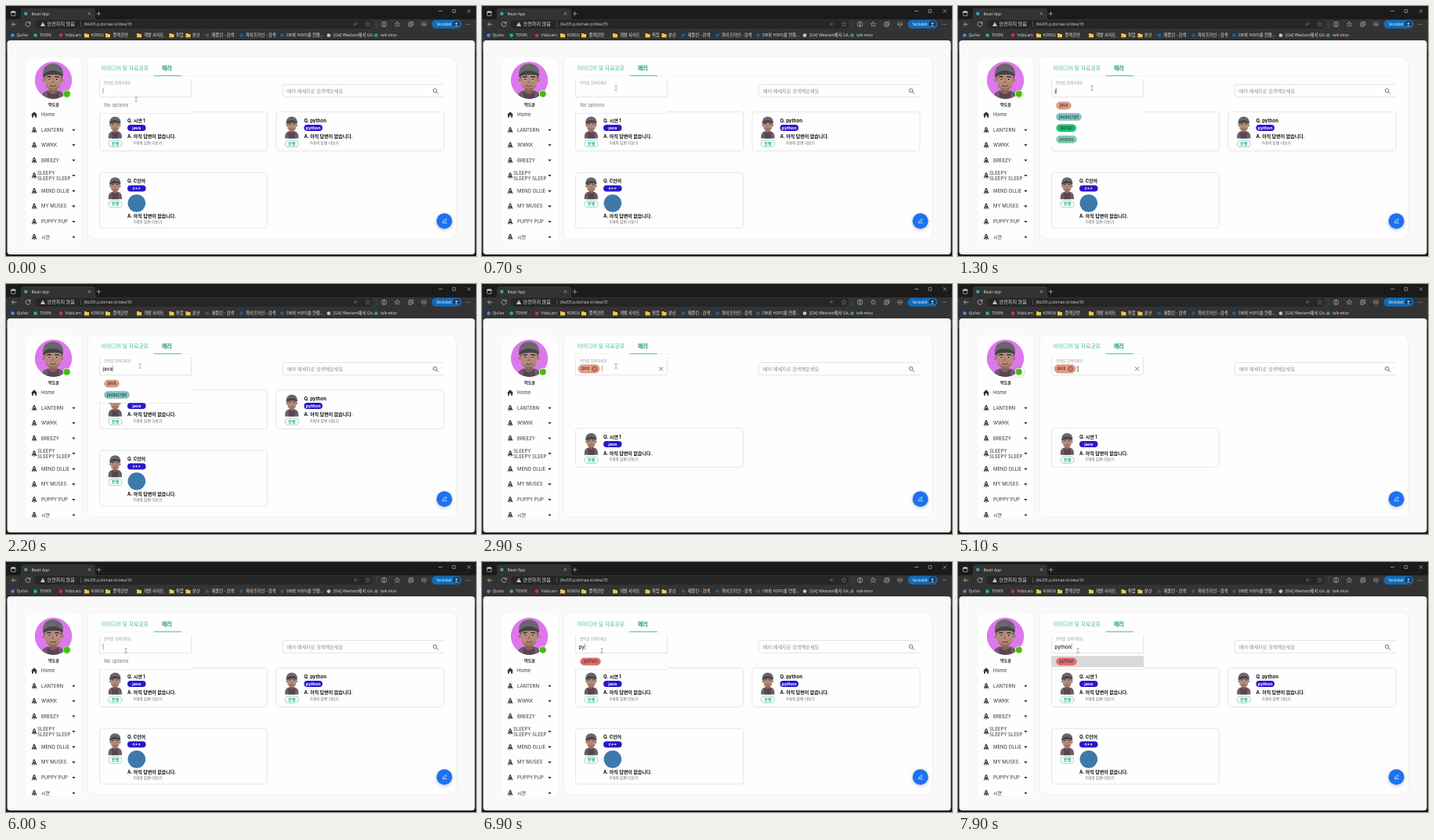
Recreate the animation shown at these times as an HTML page. Size 600 by 320 pixels, loop 8000 ms.

```html
<!DOCTYPE html>
<html lang="ko">
<head>
<meta charset="utf-8">
<title>Language search</title>
<style>
  html, body { margin: 0; width: 100%; height: 100%; overflow: hidden; background: #1b1b1b; }
  svg { display: block; width: 600px; height: 320px; }
  text { font-family: Inter, "Noto Sans CJK KR", "Noto Sans CJK", sans-serif; white-space: pre; }
  .ui { font-family: "Open Sans", "Noto Sans CJK KR", "Noto Sans CJK", sans-serif; }
  .line { fill: none; stroke-linecap: round; stroke-linejoin: round; }
  .paper { filter: drop-shadow(0 .8px .6px rgba(0,0,0,.4)); }
  .float { filter: drop-shadow(0 1.6px 2px rgba(0,0,0,.28)); }
</style>
</head>
<body>
<svg id="stage" viewBox="0 0 600 320" xmlns="http://www.w3.org/2000/svg"></svg>
<script>
const LOOP = 8000;
const stage = document.getElementById('stage');

// Markup helpers; text is placed by its vertical middle.
const text = (x, y, s, size, fill = '#333', extra = '') =>
  `<text x="${x}" y="${y + size * 0.36}" font-size="${size}" fill="${fill}" ${extra}>${s}</text>`;
const rect = (x, y, w, h, fill, r = 0, extra = '') =>
  `<rect x="${x}" y="${y}" width="${w}" height="${h}" rx="${r}" fill="${fill}" ${extra}/>`;
const circle = (x, y, r, fill, extra = '') =>
  `<circle cx="${x}" cy="${y}" r="${r}" fill="${fill}" ${extra}/>`;
const line = (d, stroke, w = 0.8, extra = '') =>
  `<path class="line" d="${d}" stroke="${stroke}" stroke-width="${w}" ${extra}/>`;
const shape = (d, fill) => `<path d="${d}" fill="${fill}"/>`;
const at = (x, y, s, body) => `<g transform="translate(${x} ${y}) scale(${s})">${body}</g>`;
const BOLD = 'font-weight="700"';
const MID = 'text-anchor="middle"';

const defs = `<defs>
  <clipPath id="face"><circle cx="60.5" cy="95" r="23.7"/></clipPath>
  <clipPath id="side"><rect x="25" y="65" width="73" height="235"/></clipPath>
  <g id="man">
    ${shape('M-16 32Q-17 18 -8 15L8 15Q17 18 16 32Z', '#6d5c69')}
    ${shape('M-5 10H5V17Q0 22 -5 17Z', '#84604f')}
    ${shape('M-7 15Q0 24 7 15L8 32H-8Z', '#57454f')}
    ${shape('M-12 -6H12L11 3H-11Z', '#3b3233')}
    ${circle(-11.3, 1.5, 2.3, '#a0786a')}${circle(11.3, 1.5, 2.3, '#a0786a')}
    ${shape('M-10.5 -6H10.5V3Q9.5 14 0 15Q-9.5 14 -10.5 3Z', '#b58a78')}
    ${shape('M-9.6 7Q-7 14 0 15Q7 14 9.6 7Q6 11.5 0 12Q-6 11.5 -9.6 7Z', '#94705f')}
    ${line('M-3.6 8.6Q0 10.6 3.8 8.2', '#65413a', 1.1)}
    ${shape('M-2 5Q0 -1 2 5Z', '#a0735f')}
    ${circle(-4.6, 0.4, 1.6, '#e6dedb')}${circle(4.6, 0.4, 1.6, '#e6dedb')}
    ${circle(-4.6, 0.4, 1.1, '#2b2020')}${circle(4.6, 0.4, 1.1, '#2b2020')}
    ${line('M-7.4 -2.6L-3 -3M3 -3L7.4 -2.6', '#33241f', 1.4)}
    ${shape('M-13 -4Q-14 -19 0 -20Q14 -19 13 -4Q0 -9 -13 -4Z', '#69666c')}
    ${shape('M-14 -3Q-9 -12 1 -11Q11 -10 13 -4Q0 -8 -14 -3Z', '#454248')}
  </g>
  <g id="rocket">
    ${shape('M0 -4.2Q2.4 -2.2 2 2.2H-2Q-2.4 -2.2 0 -4.2ZM-1.9 0L-3 1.8V3.6L-1.6 2.6ZM1.9 0L3 1.8V3.6L1.6 2.6ZM-1 2.7H1L0 4.3Z', '#3a3a3a')}
    ${circle(0, -0.9, 0.8, '#fff')}
  </g>
</defs>`;

function browser() {
  const ink = '#cfcfcf', dim = '#8d8d8d';
  const ui = (x, y, s, size = 5, fill = '#e6e6e6', extra = '') => text(x, y, s, size, fill, `class="ui" ${extra}`);
  const folder = x => shape(`M${x - 3} 35H${x - 0.6}L${x + 0.3} 36H${x + 3}V40.2H${x - 3}Z`, '#f3c64c');
  const marks = [
    [8.5, 13.5, 'Quilvo', '#4a86e8'], [37.5, 43, 'TOVEK', '#1ec35a'], [70, 75.5, 'VidoLarn', '#e0302c'],
    [103, 108.5, 'KORDU'], [130, 136.5, '플젝관련'], [170, 176, '개발 사이트'], [211.5, 217, '취업'], [232.5, 238, '분산'],
    [257, 262.5, '재플린 - 검색', '#1d5f96'], [300.5, 306, '파이프라인 - 검색', '#1d5f96'],
    [352.5, 358, 'DB와 HDFS를 연결...', '#1d5f96'], [412, 418, '[Git] Wexlam에서 Git...', '#c9c9c9'],
    [472.5, 478, 'talk-mivo', '#3d8f86']
  ];
  const size = s => /[가-힣]/.test(s) ? 5.3 : 4.9;
  return rect(0, 0, 600, 320, '#1b1b1b')
    + rect(0, 17, 600, 40, '#333333')
    + `<path d="M17 17.5Q19 17 19 14V6Q19 3 22 3H111Q114 3 114 6V14Q114 17 116 17.5Z" fill="#333333"/>`
    + rect(6.5, 7, 5.5, 5.5, 'none', 1, `stroke="${ink}" stroke-width=".7"`) + rect(6.5, 6.7, 5.5, 2, ink, 0.6)
    + circle(25.3, 9.8, 2.2, '#459db5') + ui(32.5, 9.8, 'React App', 4.8)
    + line('M105 8.4L107.8 11.2M107.8 8.4L105 11.2M116 9.8H121M118.5 7.3V12.3', ink, 0.6)
    + line('M552.5 6.5H556.7M589 4.6L592.8 8.4M592.8 4.6L589 8.4', ink, 0.6)
    + rect(570, 4.6, 3.8, 3.8, 'none', 0.5, `stroke="${ink}" stroke-width=".6"`)
    + line('M13 23.3H7.5M9.8 20.9L7.4 23.3L9.8 25.7', ink, 0.7)
    + line('M30.6 21.6A3 3 0 1 0 31 24M31 20.2V22.2H29', ink, 0.7)
    + rect(37, 18, 431, 11, '#262626', 5)
    + shape('M47 20.4L50 25.8H44Z', '#e2e2e2') + line('M47 22.4V24', '#262626', 0.6)
    + ui(52.6, 23.2, '안전하지 않음', 6.1)
    + line('M95.5 20V26.5', '#777', 0.5)
    + ui(99.5, 23.2, 'j9e205.p.domae.io/idea/35', 4.9, '#d6d6d6')
    + ui(444, 23.3, 'A', 5.4, dim) + line('M448.4 20.8Q449.6 22 448.7 23.2', dim, 0.5)
    + [[462, dim], [499.5, ink]].map(([x, c]) => line(`M${x} 20.2L${x + 1} 22.2L${x + 3.1} 22.4L${x + 1.6} 24L${x + 2} 26.1L${x} 25.1L${x - 2} 26.1L${x - 1.6} 24L${x - 3.1} 22.4L${x - 1} 22.2Z`, c, 0.5)).join('')
    + line('M473 19.5V27', '#555', 0.5)
    + rect(479.8, 20.7, 5.6, 5.2, 'none', 1, `stroke="${ink}" stroke-width=".6"`) + line('M482.6 20V26.6', ink, 0.6)
    + rect(513.7, 21.5, 4.8, 4.8, 'none', 1, `stroke="${ink}" stroke-width=".6"`) + line('M515 20.2H519.8V25M516.1 22.8V25M515 23.9H517.2', ink, 0.5)
    + line('M533.5 26.4L530.7 23.6Q530 21 532 20.7Q533 20.7 533.5 21.6Q534 20.7 535 20.7Q537 21 536.3 23.6ZM531 23.6H532.7L533.5 22.5L534.2 24.4L534.7 23.6H536', ink, 0.5)
    + rect(543.5, 17.8, 38, 11, '#116cba', 5.5) + ui(549.5, 23.2, 'Secluded', 4.5, '#fff')
    + circle(575, 23.3, 4.3, '#1a3450') + circle(575, 22.2, 1.5, '#86b6e0') + shape('M572.3 26.2Q575 22.6 577.7 26.2Z', '#86b6e0')
    + [588.2, 590.3, 592.4].map(x => circle(x, 23.3, 0.5, ink)).join('')
    + marks.map(([ix, tx, s, c]) => (c ? circle(ix, 37.5, 2.3, c) : folder(ix)) + ui(tx, 37.3, s, size(s))).join('');
}

function sidebar() {
  const items = [
    [158.7, 'LANTERN'], [178, 'WWKK'], [197.5, 'BREEZY'], [217, ''], [236.8, 'MEND OLLIE'],
    [256.3, 'MY MUSES'], [275.9, 'PUPPY PUP'], [295.4, '시연']
  ];
  const rows = items.map(([y, s], i) => {
    const up = i === items.length - 1;
    const label = s ? text(45, y, s, 6) : text(40, 213.4, 'SLEEPY', 6) + text(40, 221, 'SLEEPY SLEEP', 6);
    const arrow = up ? `M84.2 ${y + 1.2}H88.6L86.4 ${y - 1.4}Z` : `M84.2 ${y - 1}H88.6L86.4 ${y + 1.6}Z`;
    return at(36, y, 1, '<use href="#rocket"/>') + label + shape(arrow, '#333');
  }).join('');
  return `<g clip-path="url(#side)">${rect(25, 65, 72, 250, '#fefefe', 8, 'stroke="#efefef" stroke-width=".6"')}
    ${circle(60.5, 95, 23.7, '#dc78ec')}
    <g clip-path="url(#face)">${at(60, 93.5, 1, '<use href="#man"/>')}</g>
    ${text(61, 126.4, '박도윤', 5.1, '#111', BOLD + MID)}
    ${shape('M32 139.2L36 135.3L40 139.2H39V142.8H37.1V140.3H34.9V142.8H33V139.2Z', '#353535')}
    ${text(45, 139, 'Home', 6.1)}${rows}</g>`;
}

function card(x, y, title, lang, logo = false) {
  const drop = logo ? 23.5 : 0;
  return `<g transform="translate(${x} ${y})">
    ${rect(0, 0, 214, logo ? 71 : 50, '#fefefe', 3.5, 'stroke="#e0e0e0" stroke-width=".8"')}
    ${at(19.8, 16.8, 0.54, '<use href="#man"/>')}
    ${rect(11.4, 36.5, 17, 8.2, '#fff', 4.1, 'stroke="#62c9a9" stroke-width=".7"')}
    ${text(19.9, 40.5, '진행', 5, '#20a37c', MID + ' font-weight="600"')}
    ${text(35.5, 11, title, 6, '#111', BOLD)}
    ${rect(35.5, 16.4, 23.5, 8, '#2a17c9', 4)}
    ${text(47.2, 20.3, lang, 5.4, '#fff', BOLD + MID)}
    ${logo ? circle(47.3, 39.3, 11.3, '#3d79aa') : ''}
    ${text(35.5, 31.8 + drop, 'A. 아직 답변이 없습니다.', 6, '#111', BOLD)}
    ${text(43.3, 40 + drop, '0개의 답변 더보기', 4.8, '#666')}
  </g>`;
}

function page() {
  return rect(1.5, 44, 597, 274, '#f9f9f9', 4)
    + sidebar()
    + rect(104, 65, 471, 233, '#fefefe', 8, 'stroke="#eaeaea" stroke-width=".7"')
    + text(121.5, 79.3, '아이디어 및 자료공유', 6.85, '#4fbb9a')
    + text(199, 79.3, '에러', 6.9, '#129a76', BOLD)
    + line('M116 89.4H563', '#f0f0f0', 0.6) + line('M189 89.2H223.5', '#27a585', 0.8)
    + rect(119.5, 94, 117, 22.5, '#fefefe', 1.5, 'class="paper"')
    + text(125, 98, '언어를 검색하세요', 4.5, '#9a9a9a')
    + rect(353.5, 100.5, 205.5, 16, '#fefefe', 1.5, 'class="paper"')
    + text(358.8, 108.7, '에러 메세지로 검색해보세요', 6.15, '#8a8a8a')
    + circle(547.6, 108.2, 2.3, 'none', 'stroke="#555" stroke-width=".8"') + line('M549.4 110L551.6 112.2', '#555', 0.9);
}

const chipStyle = {
  java: ['#e19a80', 19], javascript: ['#7cc6c4', 32], django: ['#17c877', 25.5],
  jenkins: ['#7fcdb0', 26], python: ['#ea6a6a', 26]
};

function popup(options, lit) {
  const n = Math.max(1, options.length);
  const rows = options.map((name, i) => {
    const y = 127.5 + 14.4 * i;
    const [color, w] = chipStyle[name];
    return (lit && i === 0 ? rect(119, y - 7.3, 118, 14.4, '#d9d9d9') : '')
      + rect(125.5, y - 4.7, w, 9.4, color, 4.7, 'stroke="rgba(60,60,60,.25)" stroke-width=".5"')
      + text(125.5 + w / 2, y, name, 5.5, '#27302f', MID);
  }).join('');
  return rect(119, 117, 118, 6.4 + 14.4 * n, '#fefefe', 1.5, 'class="paper"')
    + (rows || text(125.2, 127.3, 'No options', 6.1, '#757575'));
}

function tag() {
  return rect(123, 103.3, 27, 10.6, '#e39b84', 5.3, 'stroke="#c98572" stroke-width=".5"')
    + text(126.5, 108.5, 'java', 5.5, '#3a2620')
    + circle(143.6, 108.6, 3.6, '#b4614f') + line('M142.2 107.2L145 110M145 107.2L142.2 110', '#e9b09d', 0.8)
    + line('M226.4 106.4L230.8 110.8M230.8 106.4L226.4 110.8', '#555', 0.8);
}

// Start time, typed text, option list (null = closed), flag.
const J = ['java', 'javascript', 'django', 'jenkins'], JA = J.slice(0, 2), PY = ['python'];
const steps = [
  [0, '', []],
  [1100, 'j', J], [1500, 'ja', JA], [1800, 'jav', JA], [2000, 'java', JA], [2400, 'java', JA, 'lit'],
  [2800, '', null, 'tag'],
  [5600, '', []],
  [6500, 'p', PY], [6800, 'py', PY], [7100, 'pyt', PY], [7300, 'pyth', PY], [7500, 'pytho', PY],
  [7600, 'python', PY], [7800, 'python', PY, 'lit']
];

const stateMarkup = ([, typed, options, flag]) =>
  `<g class="state">${flag === 'tag' ? tag() : ''}${text(123.5, 108.4, typed, 6.3, '#222', 'class="typed" font-weight="500"')}${options ? popup(options, flag === 'lit') : ''}</g>`;

stage.innerHTML = defs + browser() + page()
  + `<g id="all">${card(119.5, 135.5, 'Q. 시연 1', 'java')}${card(345, 135.5, 'Q. python', 'python')}${card(119.5, 213.2, 'Q. C언어', 'c++', true)}</g>`
  + `<g id="found">${card(119.5, 184.7, 'Q. 시연 1', 'java')}</g>`
  + steps.map(stateMarkup).join('')
  + line('M0 104.8V111.8', '#444', 0.5, 'id="caret"')
  + circle(559.6, 275.2, 10, '#1b72f2', 'class="float"')
  + line('M557.5 277.5L557.9 275.6L561.2 272.3L562.5 273.6L559.2 277ZM560 277.8H562.6', '#fff', 0.7)
  + circle(77.7, 112.6, 4.9, '#fff') + circle(77.7, 112.6, 4.1, '#49bd0a')
  + circle(77.7, 112.6, 4.3, 'none', 'id="ripple" stroke="#49bd0a"')
  + line('M-1.3 -3Q0 -3 0 -2.2Q0 -3 1.3 -3M0 -2.2V2.2M-1.3 3Q0 3 0 2.2Q0 3 1.3 3', '#666', 0.5, 'id="mouse"');

const byId = id => document.getElementById(id);
const [all, found, caret, ripple, mouse] = ['all', 'found', 'caret', 'ripple', 'mouse'].map(byId);
const states = [...document.querySelectorAll('.state')];
const show = (node, on) => node.setAttribute('visibility', on ? 'visible' : 'hidden');

const path = [[0, 166, 119.5], [100, 166, 119.5], [700, 171, 105], [4600, 171, 105], [5100, 152.7, 109], [5800, 153, 113.5], [LOOP, 153, 113.5]];
const smooth = x => x * x * (3 - 2 * x);

function pointer(t) {
  const i = path.findIndex(p => p[0] > t);
  const [t0, x0, y0] = path[i - 1], [t1, x1, y1] = path[i];
  const k = smooth((t - t0) / (t1 - t0));
  return [x0 + (x1 - x0) * k, y0 + (y1 - y0) * k];
}

function draw(now) {
  const t = Math.floor((now % LOOP) / 100) * 100;
  const current = steps.findLastIndex(s => s[0] <= t);
  const [start, typed, , flag] = steps[current];
  states.forEach((s, i) => show(s, i === current));
  show(all, flag !== 'tag');
  show(found, flag === 'tag');

  const width = typed ? states[current].querySelector('.typed').getComputedTextLength() : 0;
  caret.setAttribute('transform', `translate(${flag === 'tag' ? 153.3 : 124 + width} 0)`);
  show(caret, (t - start) % 1000 < 500);
  mouse.setAttribute('transform', `translate(${pointer(t)})`);

  const k = smooth(((t + 360) % 1200) / 1200);
  const scale = 0.8 + 1.6 * k;
  ripple.setAttribute('r', 4.3 * scale);
  ripple.setAttribute('stroke-width', 0.4 * scale);
  ripple.setAttribute('opacity', 1 - k);
}

const origin = performance.now();
function tick() {
  draw(performance.now() - origin);
  requestAnimationFrame(tick);
}
tick();
</script>
</body>
</html>
```
